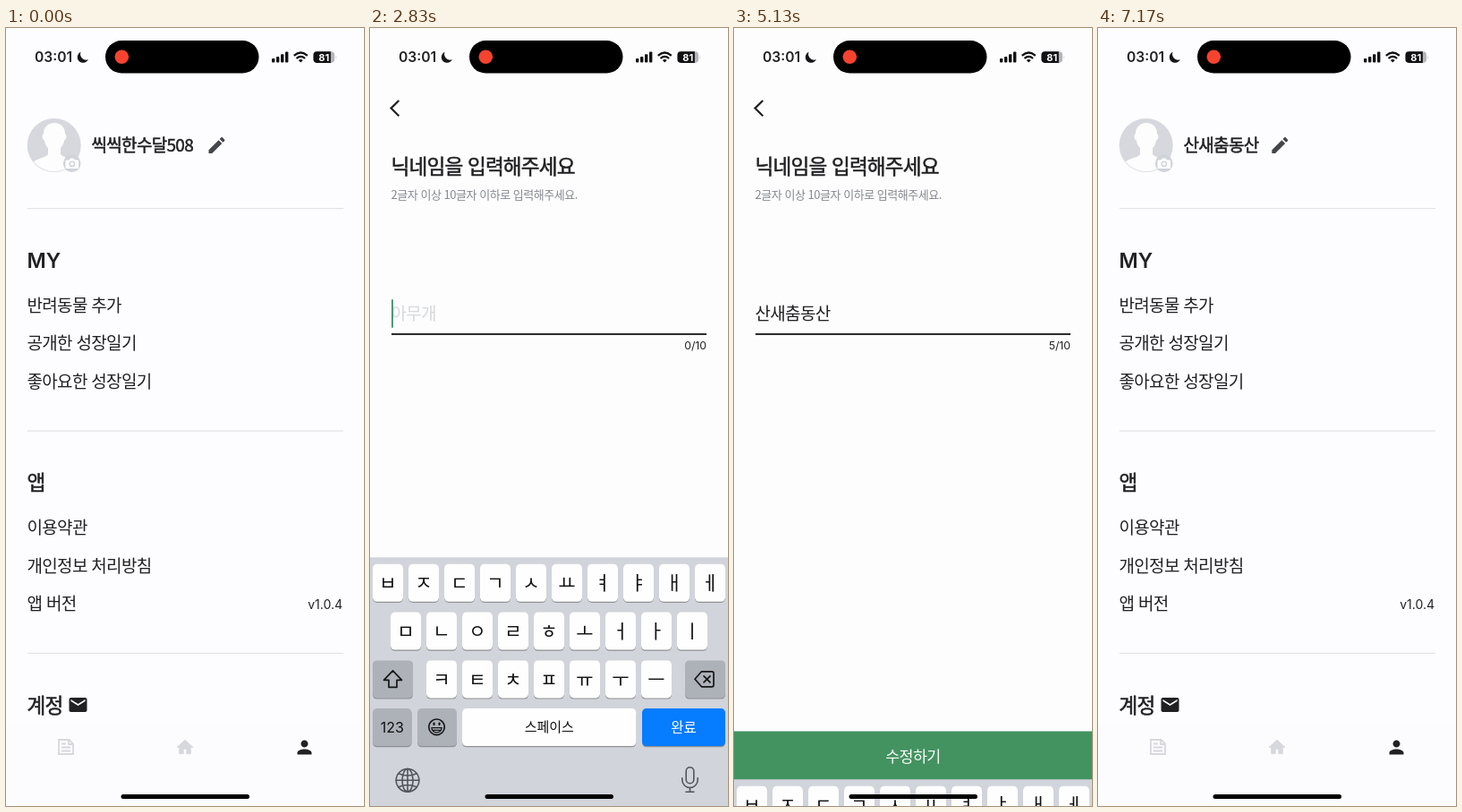
Recreate the animation shown at these times as an HTML page. Size 400 px wide and 869 px high, loop 7200 ms.

```html
<!DOCTYPE html>
<html lang="ko">
<head>
<meta charset="utf-8">
<title>Profile nickname</title>
<style>
  html, body { margin: 0; width: 100%; height: 100%; overflow: hidden; background: #fdfdfe; }
  svg { display: block; width: 100vw; height: 100vh; }
  text { font-family: "Noto Sans CJK KR", "Noto Sans CJK", "Noto Sans", sans-serif; letter-spacing: -.036em; fill: #212123; white-space: pre; }
  .latin { font-family: Inter, "Noto Sans", sans-serif; letter-spacing: 0; }
  .semi { stroke: #212123; stroke-width: .55px; }
  .key text { letter-spacing: 0; }
</style>
</head>
<body>
<svg id="stage" viewBox="0 0 400 869">
  <g id="profile">
    <rect width="400" height="869" fill="#fdfcfe"/>
    <g id="avatar">
      <clipPath id="round"><circle cx="53.7" cy="131" r="29.3"/></clipPath>
      <circle cx="53.7" cy="131" r="30" fill="#d6d8de"/>
      <path clip-path="url(#round)" fill="#fdfdfe" d="M54 106c-7.500 0-12 5-12 12c-2 1-2 6 .8 7.500c.7 4 2.200 6.500 4.200 8.500v7c-3 5-17 4-22 15v10h58v-10c-5-11-18-10-22-15v-7c2-2 3.500-4.500 4.200-8.500c2.800-1.500 2.800-6.500 .8-7.500c0-7-4.500-12-12-12z"/>
      <circle cx="73.700" cy="151.300" r="9.800" fill="#d0d3d9"/>
      <path d="M67.500 147.500h3l1.500-2h3.600l1.500 2h3q1 0 1 1v7.500q0 1-1 1h-12.600q-1 0-1-1v-7.500q0-1 1-1z" fill="#fdfdfe"/>
      <circle cx="73.800" cy="151.800" r="2.700" fill="none" stroke="#cdd0d7" stroke-width="1.300"/>
    </g>
    <text id="name" class="semi" x="95.500" y="138" font-size="19"></text>
    <path id="pencil" fill="#44464c" d="M3 17.25V21h3.75L17.81 9.94l-3.75-3.75L3 17.25zM20.71 7.04c.39-.39.39-1.02 0-1.41l-2.34-2.34c-.39-.39-1.02-.39-1.41 0l-1.83 1.83 3.75 3.75 1.83-1.83z"/>
    <g id="menu"></g>
    <path transform="translate(68.500 744)" fill="#212123" d="M20 4H4c-1.100 0-2 .9-2 2v12c0 1.100.9 2 2 2h16c1.100 0 2-.9 2-2V6c0-1.100-.9-2-2-2zm0 4l-8 5-8-5V6l8 5 8-5v2z"/>
    <rect y="776" width="400" height="93" fill="#fcfbfe"/>
    <g fill="none" stroke="#d6d8de" stroke-width="1.800">
      <path d="M59 795h11.500l4.500 4.500v11.500h-16zM70 795v5h5"/>
      <path d="M62 799.500h5M62 803.500h10M62 807.500h10"/>
    </g>
    <path transform="translate(189.200 792.600) scale(.9)" fill="#d6d8de" stroke="#d6d8de" stroke-linejoin="round" d="M10 20v-6h4v6h5v-8h3L12 3 2 12h3v8z"/>
    <path transform="translate(321.500 791.500)" fill="#212123" d="M12 12c2.210 0 4-1.790 4-4s-1.790-4-4-4-4 1.790-4 4 1.790 4 4 4zm0 2c-2.670 0-8 1.340-8 4v2h16v-2c0-2.660-5.330-4-8-4z"/>
  </g>

  <g id="editor">
    <rect width="400" height="869" fill="#fdfdfe"/>
    <path d="M32.300 81l-8.800 8.600 8.800 8.600" fill="none" stroke="#212123" stroke-width="2.200"/>
    <text class="semi" x="23.500" y="162.500" font-size="22.600">닉네임을 입력해주세요</text>
    <text x="23.500" y="190.800" font-size="13" style="fill:#85888f">2글자 이상 10글자 이하로 입력해주세요.</text>
    <text id="entry" x="23.500" y="326" font-size="19"></text>
    <rect id="caret" y="303" width="1.900" height="32" rx="1" fill="#43936c"/>
    <rect x="24" y="341" width="352" height="1.900" fill="#212123"/>
    <text id="count" class="latin" x="376" y="359.300" font-size="12.200" text-anchor="end"></text>
    <rect y="785.500" width="400" height="84" fill="#439360"/>
    <text id="submit" x="200" y="820.300" font-size="17.400" text-anchor="middle">수정하기</text>
  </g>

  <g id="keyboard">
    <rect y="580" width="400" height="300" fill="#d1d4da"/>
    <g id="keys"></g>
    <g fill="none" stroke="#161618" stroke-width="1.700" stroke-linejoin="round" stroke-linecap="round">
      <path d="M25.500 706.500l10 10.500h-5.500v8h-9v-8h-5.500z"/>
      <path d="M370.500 707.500h11.500q2 0 2 2v13q0 2-2 2h-11.500l-7.500-8.500zM373 712.500l7 7M380 712.500l-7 7"/>
      <circle cx="74.500" cy="769.500" r="8.800"/>
      <path d="M68.800 770.300h11.400q-.7 5.200-5.700 5.200t-5.700-5.200zM70 773h9" stroke-width="1.200"/>
      <path d="M71.500 765.300v1.500M77.500 765.300v1.500" stroke-width="2.200"/>
    </g>
    <g fill="none" stroke="#52555b" stroke-width="1.600" stroke-linecap="round">
      <circle cx="42" cy="829" r="12.800"/>
      <ellipse cx="42" cy="829" rx="6" ry="12.800"/>
      <path d="M42 816.200v25.600M29.200 829h25.600M32 821.500q10 4.500 20 0M32 836.500q10-4.500 20 0"/>
      <rect x="353.200" y="814.500" width="8.600" height="18" rx="4.300"/>
      <path d="M348.800 826.500v2a8.700 8.700 0 0 0 17.400 0v-2M357.500 837.500v4.500M353 842h9"/>
    </g>
  </g>

  <g id="status">
    <text class="latin" x="32" y="38.200" font-size="15.600" font-weight="600">03:01</text>
    <path d="M83.500 26.800a6.300 6.300 0 1 0 8.300 8.400a6.500 6.500 0 0 1-8.300-8.400z" fill="#161618"/>
    <rect x="111" y="14" width="171.500" height="36.500" rx="18.250"/>
    <circle cx="129.300" cy="32.300" r="7.800" fill="#f5432f"/>
    <g fill="#111113">
      <rect x="297" y="34" width="3.400" height="4.500" rx="1"/>
      <rect x="302" y="32" width="3.400" height="6.500" rx="1"/>
      <rect x="307" y="29.300" width="3.400" height="9.200" rx="1"/>
      <rect x="312" y="26.500" width="3.400" height="12" rx="1"/>
    </g>
    <g fill="none" stroke="#111113" stroke-width="2.300">
      <path d="M321.800 30.800q7.500-6.600 15 0M324.500 34q4.800-4.200 9.600 0"/>
      <path d="M329.300 38.500l-2.500-2.600q2.500-1.900 5 0z" fill="#111113" stroke="none"/>
    </g>
    <rect x="343.500" y="26.300" width="23.500" height="12.600" rx="3.800" fill="#b5b6ba"/>
    <path d="M347.300 26.300h15.500v12.600h-15.500a3.800 3.800 0 0 1-3.800-3.800v-5a3.800 3.800 0 0 1 3.800-3.800z" fill="#111113"/>
    <path d="M368.200 30.700q1.600 1.900 0 3.800z" fill="#b5b6ba"/>
    <text class="latin" x="355.200" y="36.600" font-size="11" font-weight="700" text-anchor="middle" style="fill:#fff">81</text>
    <rect x="128.500" y="856" width="143.500" height="5" rx="2.500"/>
  </g>
</svg>
<script>
const LOOP = 7200, PUSH = 1300, POP = 5690, NAV = 500;
const FOCUS = 2555, BLUR = 4920, TYPE = 3150, STROKE = 112;
const OLD_NAME = '씩씩한수달508', NEW_NAME = '산새춤동산', HINT = '아무개';
// text after each keystroke; a consonant first joins an open syllable
const STROKES = 'ㅅ 사 산 산ㅅ 산새 산샟 산새추 산새춤 산새춤ㄷ 산새춤도 산새춤동 산새춤동ㅅ 산새춤동사 산새춤동산'.split(' ');
const $ = id => document.getElementById(id);
const clamp = v => Math.min(1, Math.max(0, v));

function add(parent, tag, attrs, content) {
  const el = document.createElementNS('http://www.w3.org/2000/svg', tag);
  for (const k in attrs) el.setAttribute(k, attrs[k]);
  if (content) el.textContent = content;
  parent.appendChild(el);
  return el;
}

function buildMenu() {
  const menu = $('menu');
  const heading = (y, s) => add(menu, 'text', { x: 23.5, y, 'font-size': 22.6, class: 'semi' }, s);
  const items = (y, list) => list.forEach((s, i) =>
    add(menu, 'text', { x: 23.5, y: y + i * 42.7, 'font-size': 19 }, s));
  const rule = y => add(menu, 'rect', { x: 24, y, width: 353, height: 1.1, fill: '#dfe1e5' });
  [201, 449.5, 697.8].forEach(rule);
  add(menu, 'text', { x: 23.5, y: 267.5, 'font-size': 23, 'font-weight': 600, class: 'latin' }, 'MY');
  items(316.5, ['반려동물 추가', '공개한 성장일기', '좋아요한 성장일기']);
  heading(516, '앱');
  items(565, ['이용약관', '개인정보 처리방침', '앱 버전']);
  add(menu, 'text', { x: 376, y: 649, 'font-size': 14, 'text-anchor': 'end', class: 'latin' }, 'v1.0.4');
  heading(764.5, '계정');
}

function key(x, y, w, label = '', { fill = '#fefefe', size = 21, ink = '#111', cls = '' } = {}) {
  const g = add($('keys'), 'g', { class: 'key' });
  add(g, 'rect', { x, y: y + 1.2, width: w, height: 42, rx: 4.8, fill: '#8f9196' });
  add(g, 'rect', { x, y, width: w, height: 42, rx: 4.8, fill });
  if (label) add(g, 'text', {
    x: x + w / 2, y: y + 21 + size * .36, 'font-size': size,
    'text-anchor': 'middle', class: cls, style: `fill:${ink}`
  }, label);
}

function buildKeyboard() {
  const gray = '#adb1b8';
  [['ㅂㅈㄷㄱㅅㅛㅕㅑㅐㅔ', 3], ['ㅁㄴㅇㄹㅎㅗㅓㅏㅣ', 23], ['ㅋㅌㅊㅍㅠㅜㅡ', 63]].forEach(([row, x], r) =>
    [...row].forEach((c, i) => key(x + i * 40, 587.5 + r * 53.8, 34, c)));
  key(3, 695.1, 45, '', { fill: gray });
  key(352, 695.1, 45, '', { fill: gray });
  key(3, 748.8, 43.5, '123', { fill: gray, size: 16, cls: 'latin' });
  key(53, 748.8, 44, '', { fill: gray });
  key(103, 748.8, 194.5, '스페이스', { size: 15 });
  key(304, 748.8, 93, '완료', { fill: '#067cff', size: 15.5, ink: '#fff' });
}

// y of a cubic Bezier from (0,0) to (1,1) at a given x
function bezier(x1, y1, x2, y2) {
  const at = (a, b, u) => 3 * (1 - u) ** 2 * u * a + 3 * (1 - u) * u * u * b + u ** 3;
  return x => {
    if (x <= 0 || x >= 1) return clamp(x);
    let lo = 0, hi = 1;
    for (let i = 0; i < 24; i++) {
      const mid = (lo + hi) / 2;
      if (at(x1, x2, mid) < x) lo = mid; else hi = mid;
    }
    return at(y1, y2, lo);
  };
}

// page slide: two curves joined at (MX, MY)
const MX = .198, MY = .541;
const rise = bezier(.056 / MX, .024 / MY, .108 / MX, .3085 / MY);
const settle = bezier((.3655 - MX) / (1 - MX), 1, (.5465 - MX) / (1 - MX), (.989 - MY) / (1 - MY));
const slide = p => p < MX ? MY * rise(p / MX) : MY + (1 - MY) * settle((p - MX) / (1 - MX));
const parallaxIn = bezier(.35, .91, .33, .97);
const parallaxOut = bezier(.67, .03, .65, .09);

// critically damped spring, from 1 down to 0
function spring(ms) {
  const wt = 18.26 * Math.max(0, ms) / 1000;
  return (1 + wt) * Math.exp(-wt);
}

const shift = (id, x, y) => $(id).setAttribute('transform', `translate(${x.toFixed(2)} ${y.toFixed(2)})`);
const setText = (id, s) => { if ($(id).textContent !== s) $(id).textContent = s; };
const show = (id, on) => $(id).setAttribute('visibility', on ? 'visible' : 'hidden');

function typedAt(t) {
  const n = Math.floor((t - TYPE) / STROKE);
  return n < 0 ? '' : STROKES[Math.min(n, STROKES.length - 1)];
}

function render(t) {
  const popping = t >= POP;
  const p = clamp((t - (popping ? POP : PUSH)) / NAV);
  const presence = popping ? 1 - slide(p) : slide(p);
  const parallax = popping ? parallaxOut(1 - p) : parallaxIn(p);
  shift('profile', -400 / 3 * parallax, 0);
  shift('editor', 400 * (1 - presence), 0);
  show('editor', presence > 0);

  const renamed = t > BLUR;
  setText('name', renamed ? NEW_NAME : OLD_NAME);
  shift('pencil', renamed ? 191.3 : 223.5, 119);

  const typed = typedAt(t);
  setText('entry', typed || HINT);
  $('entry').style.fill = typed ? '#212123' : '#d6d8de';
  setText('count', typed.length + '/10');
  $('submit').style.fill = typed ? '#fafcfa' : '#3a8052';
  show('caret', t >= FOCUS && t < BLUR);
  $('caret').setAttribute('x', 24 + 16.8 * typed.length);

  const hidden = t < BLUR ? spring(t - FOCUS) : 1 - spring(t - BLUR);
  shift('keyboard', 0, 289 * hidden);
  show('keyboard', hidden < .999);
}

buildMenu();
buildKeyboard();
const start = performance.now();
function tick() {
  render((performance.now() - start) % LOOP);
  requestAnimationFrame(tick);
}
tick();
</script>
</body>
</html>
```
